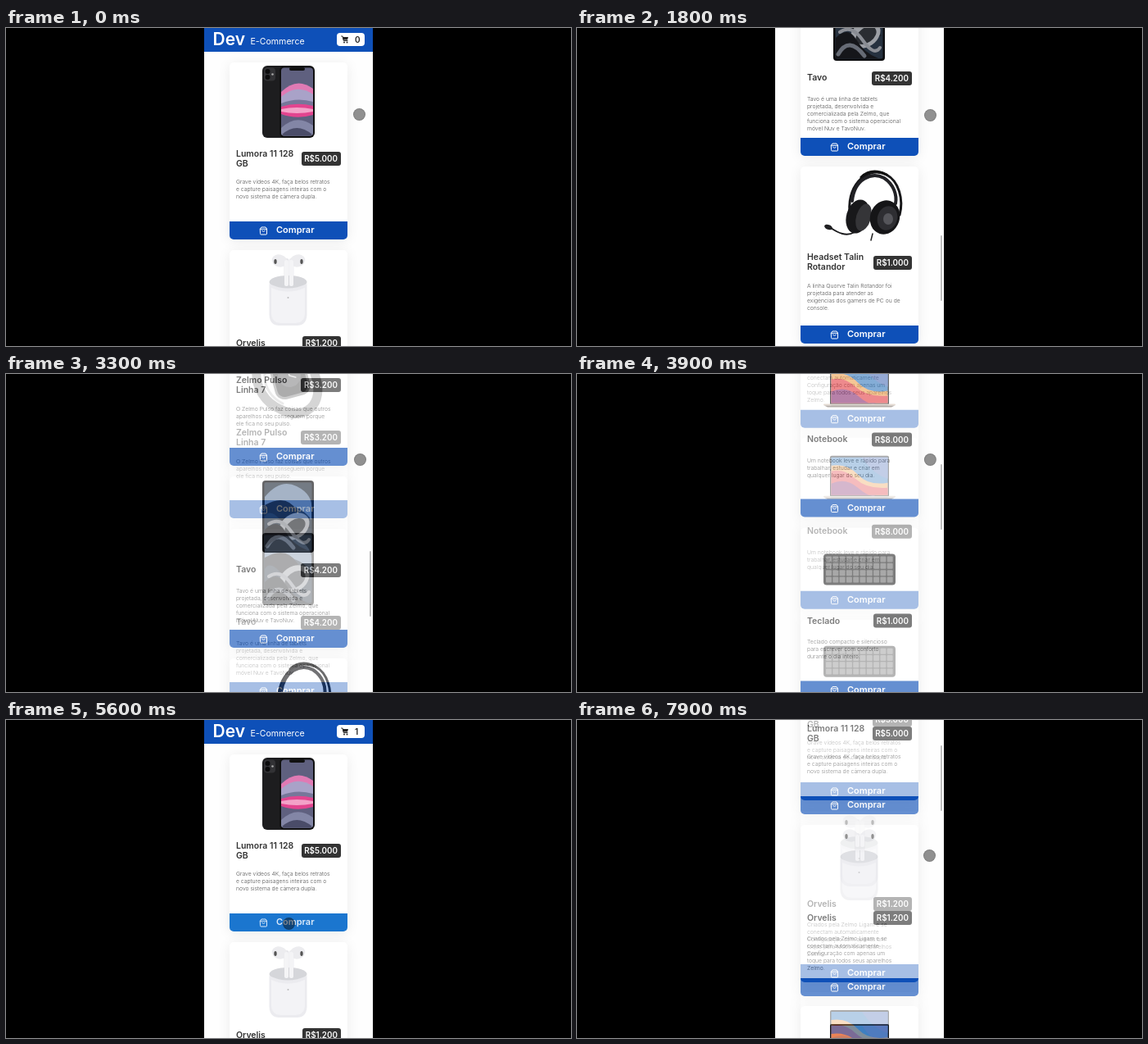
An HTML page for the animation above (8000 ms loop, 690 px wide and 388 px high).

```html
<!DOCTYPE html>
<html lang="pt-BR">
<head>
<meta charset="utf-8">
<style>
html, body { margin: 0; width: 100%; height: 100%; overflow: hidden; background: #000; }
body { position: relative; font-family: Inter, "Open Sans", sans-serif; }
#phone { position: absolute; left: 242px; top: 0; width: 206px; height: 388px; overflow: hidden; background: #fff; }
.page { position: absolute; left: 0; top: 0; width: 206px; height: 1875px; background: #fefefe; }
.page.ghost { opacity: .36; }
header { height: 29px; background: #0e50b8; color: #fff; }
header * { position: absolute; }
header b { left: 10.5px; top: 0; font: 600 21px/28px Inter, sans-serif; }
header i { left: 56.5px; top: 10px; font: 400 10.6px/14px Inter, sans-serif; }
.cart { left: 162px; top: 5.5px; width: 34px; height: 16.5px; border-radius: 4px; background: #fff; color: #222; }
.cart svg { left: 5px; top: 3.5px; }
.cart span { left: 22px; font: 600 10px/17px Inter, sans-serif; }
.card { position: absolute; left: 31px; width: 144px; border-radius: 5px; background: #fff; box-shadow: 0 2px 16px rgba(0,0,0,.08); }
.card > svg { position: absolute; left: 0; top: 0; }
.row { position: absolute; left: 8px; right: 8.5px; top: 105.5px; display: flex; align-items: center; justify-content: space-between; }
.name { font: 600 10.5px/12px Inter, sans-serif; color: #333; white-space: pre; }
.price { font: 600 9.8px/17px Inter, sans-serif; background: #333; color: #fff; padding: 0 3.6px; border-radius: 3px; }
.text { position: absolute; left: 8px; font: 300 6.8px/9.05px Inter, sans-serif; color: #555; white-space: pre; }
.buy { position: absolute; left: 0; right: 0; bottom: 0; height: 22px; border-radius: 0 0 5px 5px; background: #0e50b8; color: #fff; }
.buy svg { position: absolute; left: 35.5px; top: 6px; }
.buy span { position: absolute; left: 57px; font: 600 11px/21.5px Inter, sans-serif; }
.hover .card:nth-of-type(1) .buy { background: #1b76cf; color: #dceafa; }
#bar { position: absolute; left: 201.5px; width: 2.5px; height: 80px; border-radius: 2px; background: #bdbdbd; }
#dot { position: absolute; left: -7.5px; top: -7.5px; width: 13px; height: 13px; border-radius: 50%; background: rgba(0,0,0,.43); border: 1px solid rgba(0,0,0,.12); }
</style>
</head>
<body>
<div id="phone"><div id="bar"></div><div id="dot"></div></div>
<script>
const path = (d, fill) => `<path d="${d}" fill="${fill}"/>`;
const line = (d, color, w) => `<path d="${d}" fill="none" stroke="${color}" stroke-width="${w}" stroke-linecap="round"/>`;
const rect = (x, y, w, h, r, fill) => `<rect x="${x}" y="${y}" width="${w}" height="${h}" rx="${r}" fill="${fill}"/>`;
const oval = (x, y, rx, ry, fill, turn = 0) =>
  `<ellipse rx="${rx}" ry="${ry}" fill="${fill}" transform="translate(${x} ${y}) rotate(${turn})"/>`;
const svg = (w, h, body) => `<svg width="${w}" height="${h}" viewBox="0 0 ${w} ${h}">${body}</svg>`;

const art = {
  phone: rect(40, 4, 40, 88, 6, '#1d1d1f') + rect(42, 6.5, 14, 16, 4, '#323235') +
    oval(46.5, 11, 3, 3, '#0b0b0c') + oval(46.5, 18, 3, 3, '#0b0b0c') + oval(52.5, 14.5, 1.3, 1.3, '#aaa') +
    rect(61, 4, 43, 88, 6, '#111') + rect(63, 6.5, 39, 83, 4, '#5f607f') +
    path('M63 36Q82 17 102 32V46H63Z', '#e07ab4') + path('M63 42Q82 25 102 39V52H63Z', '#a9a2c8') +
    path('M63 50Q82 42 102 48V56H63Z', '#77779a') + path('M63 54Q82 48 102 53V64Q82 70 63 63Z', '#e3448f') +
    path('M63 57Q82 53 102 57V60Q82 64 63 60Z', '#f3a2c8') +
    path('M63 80Q82 62 102 77V86Q102 89.5 98 89.5H67Q63 89.5 63 86Z', '#8386a6') +
    path('M64 88Q82 72 101 88L98 89.5H67Z', '#4a4c68') + rect(73, 6, 19, 4, 2, '#111'),
  buds: rect(66.5, 10, 6, 38, 3, '#e6e6ea') + rect(72.5, 10, 6, 38, 3, '#eeeef1') +
    oval(61, 13, 9.5, 7.5, '#ececef', 15) + oval(83, 13, 9.5, 7.5, '#ececef', -15) +
    oval(56, 14, 1.7, 3, '#555') + oval(88, 14, 1.7, 3, '#555') +
    oval(71.5, 39, 23, 8, '#d5d6da') + rect(67, 12, 5, 32, 2, '#f4f4f6') + rect(73, 12, 5, 32, 2, '#f4f4f6') +
    path('M48.5 41Q71 52 94.5 41V79Q94 92 82 92H61Q49 92 48.5 79Z', '#ebebef') +
    path('M51 46Q71 55 92 46V78Q91 89 81 89H62Q52 89 51 78Z', '#f3f3f6') + oval(71.5, 58, 1, 1, '#bbb'),
  laptop: rect(36, 22, 72, 51, 2, '#161618') + rect(37.5, 24, 69, 46, 0, '#3e7fc0') +
    path('M37.5 34Q57 31 70 45T106.5 55V70H37.5Z', '#f0a65a') +
    path('M37.5 41Q53 37 67 50T106.5 61V70H37.5Z', '#e5484d') +
    path('M37.5 56Q55 48 70 61T92 70H37.5Z', '#8e3a78') +
    path('M75 24H106.5V50Q88 44 75 24Z', '#5a79bd') +
    rect(28, 71, 88, 2, 1, '#d8c9bd') + path('M29 73H115L111 75H33Z', '#8b8179'),
  keys: rect(28, 32, 88, 38, 4, '#333') +
    [0, 1, 2, 3].map(r => [...Array(10).keys()].map(c => rect(31 + c * 8.3, 35 + r * 8.3, 7, 7, 1, '#777')).join('')).join(''),
  watch: line('M60 19C25 8 22 66 62 83C91 98 118 78 104 40', '#8c8c8c', 11) +
    line('M62 25C36 22 36 62 65 76', '#c6c6c6', 3) +
    `<g transform="rotate(-15 73 42)">${rect(51, 15, 44, 54, 12, '#777')}${rect(54, 18, 38, 48, 9, '#1b1b1d')}${oval(73, 42, 14, 14, '#3a3a3e')}${line('M73 32V42L80 46', '#ddd', 1.5)}</g>`,
  tablet: rect(40, 5, 63, 88, 4, '#0d0d0f') + rect(42.5, 7.5, 58, 83, 2, '#26313f') +
    path('M43 25Q62 2 82 12T100 40V53Q80 25 43 42Z', '#7288a6') +
    path('M43 35Q69 20 83 42T100 62Q77 70 63 54T43 49Z', '#1b1d22') +
    oval(79, 61, 20, 15, '#9c9fa5', -35) + oval(80, 62, 14, 9, '#2a2d32', -35) +
    path('M43 65Q58 50 68 67T95 90H43Z', '#15161a') +
    line('M48 58Q62 48 76 68T97 77', '#8a8d94', 4) + line('M46 85Q59 62 78 87', '#666b75', 5),
  headset: line('M60 55C57 19 85 -1 105 10C120 18 126 40 121 59', '#171719', 3) +
    line('M63 42C66 15 87 6 102 14C114 22 118 35 116 45', '#222226', 4) +
    line('M74 13Q87 1 105 10', '#111', 3) +
    oval(70, 61, 14, 21, '#18181a', 16) + oval(77, 62, 9, 17, '#353538', 16) +
    oval(103, 62, 18, 21, '#151517', 18) + oval(106, 63, 12, 15, '#2e2e32', 18) + oval(107, 64, 6, 7, '#55555a') +
    line('M66 80C56 86 46 81 37 75', '#1a1a1c', 2) + oval(34, 74, 5, 3, '#202023', 20) + line('M88 82L86 90', '#222', 1.5),
  mouse: rect(53, 14, 38, 68, 19, '#333') + line('M72 15V40', '#888', 1) + rect(70, 23, 4, 11, 2, '#999')
};

const goods = [
  ['phone', 'Lumora 11 128\nGB', '5.000', 'Grave vídeos 4K, faça belos retratos\ne capture paisagens inteiras com o\nnovo sistema de câmera dupla.'],
  ['buds', 'Orvelis', '1.200', 'Criados pela Zelmo Ligam e se\nconectam automaticamente\nConfiguração com apenas um\ntoque para todos seus aparelhos\nZelmo.'],
  ['laptop', 'Notebook', '8.000', 'Um notebook leve e rápido para\ntrabalhar, estudar e criar em\nqualquer lugar do seu dia.'],
  ['keys', 'Teclado', '1.000', 'Teclado compacto e silencioso\npara escrever com conforto\ndurante o dia inteiro.'],
  ['watch', 'Zelmo Pulso\nLinha 7', '3.200', 'O Zelmo Pulso faz coisas que outros\naparelhos não conseguem porque\nele fica no seu pulso.'],
  ['tablet', 'Tavo', '4.200', 'Tavo é uma linha de tablets\nprojetada, desenvolvida e\ncomercializada pela Zelmo, que\nfunciona com o sistema operacional\nmóvel Nuv e TavoNuv.'],
  ['headset', 'Headset Talin\nRotandor', '1.000', 'A linha Quorve Talin Rotandor foi\nprojetada para atender as\nexigências dos gamers de PC ou de\nconsole.'],
  ['mouse', 'Mouse', '300', 'Mouse sem fio com sensor preciso\ne bateria de longa duração.']
];

const bag = svg(11, 11, line('M1.5 3L3 1H8L9.5 3V9Q9.5 10 8.5 10H2.5Q1.5 10 1.5 9ZM1.5 3.3H9.5M3.5 5Q5.5 8 7.5 5', 'currentColor', 1));
const trolley = svg(10, 10, line('M.7 1H2L3.3 6.5H8', '#222', 1) + path('M2 2H9L8 5.5H3Z', '#222') +
  oval(4, 8.5, 1, 1, '#222') + oval(7.5, 8.5, 1, 1, '#222'));

let nextY = 42;
const cards = goods.map(([pic, title, price, text]) => {
  const two = title.includes('\n'), h = two ? 216 : 209, y = nextY;
  nextY += h + 12.6;
  return `<section class="card" style="top:${y}px;height:${h}px">${svg(144, 100, art[pic])}
    <div class="row"><div class="name">${title}</div><div class="price">R$${price}</div></div>
    <div class="text" style="top:${two ? 141.3 : 134.5}px">${text}</div>
    <div class="buy">${bag}<span>Comprar</span></div></section>`;
}).join('');

const $ = id => document.getElementById(id);
const phone = $('phone'), bar = $('bar'), dot = $('dot');
const page = document.createElement('div');
page.className = 'page';
page.innerHTML = `<header><b>Dev</b><i style="font-style:normal">E-Commerce</i><div class="cart">${trolley}<span>0</span></div></header>${cards}`;
const ghost = page.cloneNode(true);
ghost.classList.add('ghost');
phone.prepend(page, ghost);
const counts = phone.querySelectorAll('.cart span');

// [time, scroll] and [time, x, y]
const scrollKeys = [[300, 0], [500, 180], [600, 310], [800, 405], [900, 405], [1100, 660], [1300, 810],
  [1400, 810], [1600, 1070], [1800, 1217], [1900, 1217], [2100, 1400], [2300, 1487], [2500, 1487],
  [3300, 1039], [3400, 975], [3500, 975], [4200, 190], [4400, 110], [4500, 106], [4600, 101], [5000, 0],
  [5600, 0], [6000, 70], [6400, 130], [6500, 135], [6900, 193], [7300, 193], [7800, 160], [7900, 143]];
const dotKeys = [[0, 431, 105], [1800, 431, 106], [3300, 432, 104], [4400, 430, 104], [4500, 428, 105], [5300, 352, 245],
  [5400, 345, 248], [6400, 345, 248], [7000, 345, 285.5], [7300, 345, 285.5], [7900, 430, 165]];

function at(keys, t, n = 1) {
  const i = keys.findIndex(k => k[0] >= t);
  if (i < 0) return keys[keys.length - 1][n];
  if (i === 0) return keys[0][n];
  const a = keys[i - 1], b = keys[i];
  return a[n] + (b[n] - a[n]) * (t - a[0]) / (b[0] - a[0]);
}

function draw(now) {
  const t = Math.floor(now % 8000 / 100) * 100;
  const y = at(scrollKeys, t), y2 = at(scrollKeys, t < 5400 ? t + 100 : t - 100);
  const moving = t > 2500 && Math.abs(y - y2) > 3;
  page.style.transform = `translateY(${-y}px)`;
  ghost.style.transform = `translateY(${-y2}px)`;
  ghost.style.display = moving ? '' : 'none';
  phone.classList.toggle('hover', t >= 5600 && t < 5900);
  counts.forEach(c => c.textContent = t < 5600 ? 0 : 1);
  bar.style.display = y > 0 ? '' : 'none';
  bar.style.top = 1 + y * .207 + 'px';
  dot.style.transform = `translate(${at(dotKeys, t) - 242}px,${at(dotKeys, t, 2)}px)`;
  requestAnimationFrame(draw);
}
requestAnimationFrame(draw);
</script>
</body>
</html>
```
